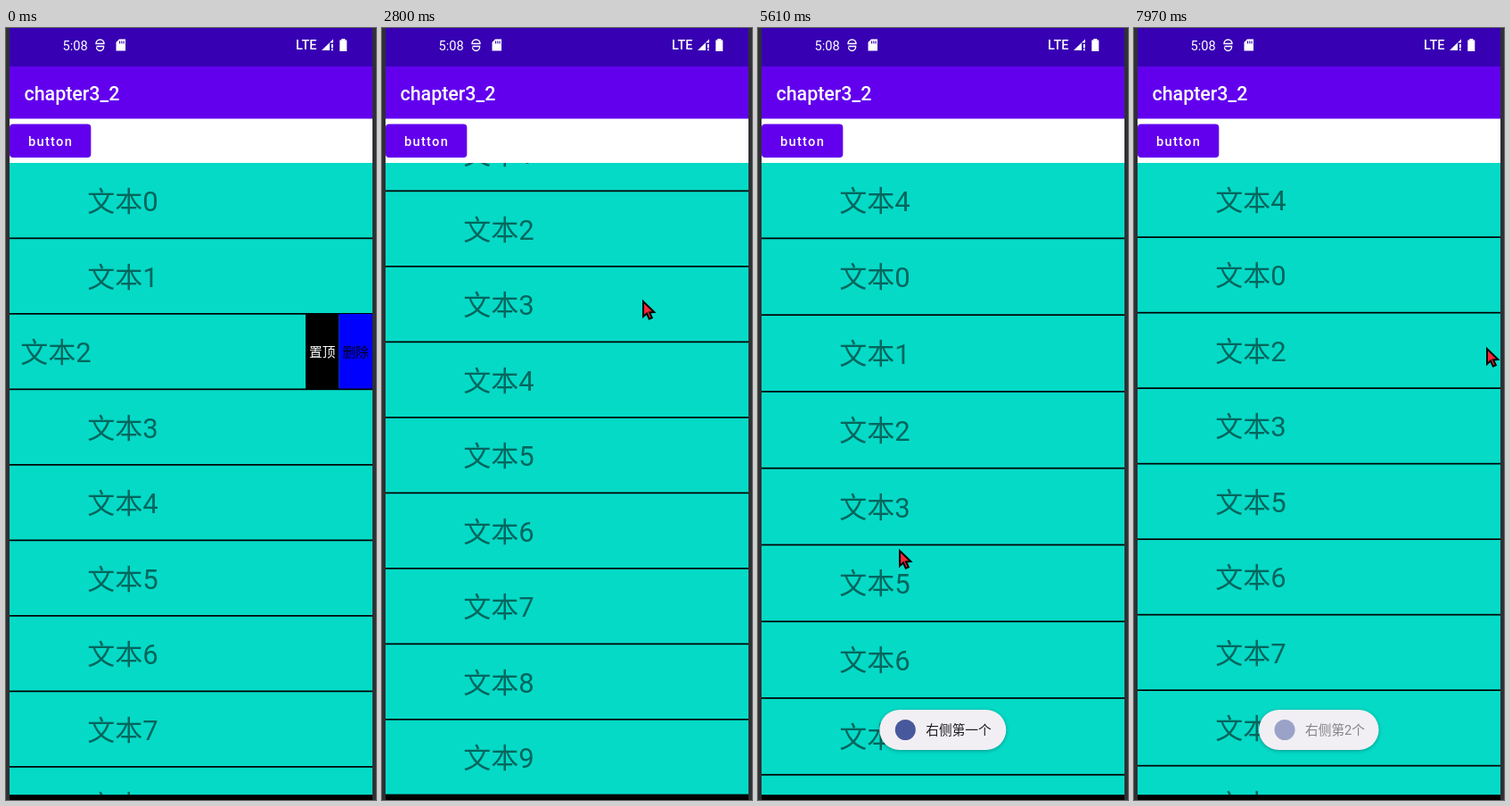
Recreate the animation shown at these times as an HTML page with a canvas. Size 415 px wide and 864 px high, loop 8 s.

```html
<!DOCTYPE html>
<html lang="zh-CN">
<head>
<meta charset="utf-8">
<style>
html, body { margin: 0; width: 100%; height: 100%; overflow: hidden; background: #000; }
canvas { display: block; }
</style>
</head>
<body>
<canvas id="stage" width="415" height="864"></canvas>
<script>
const ctx = document.getElementById('stage').getContext('2d');
const LOOP = 8000, LEFT = 4, RIGHT = 411, WIDTH = RIGHT - LEFT, TOP = 151, BOTTOM = 858;
const PITCH = 84.5, MENU = 75, MAX_SCROLL = 137.5;
const TEAL = '#05dac7', PURPLE = '#6200ee', STATUS = '#3700b3', MUTED = '#03665d';
const MOVED = 4950, REMOVED = 7900;

// Pointer gestures: down, up, start x, start y, end x, end y.
const gestures = [
  [-700, -680, 430, 880, 430, 880],
  [1020, 1400, 301, 363, 390, 370],
  [1900, 2430, 300, 540, 292, 305],
  [3400, 3560, 175, 390, 171, 528],
  [3980, 4260, 290, 522, 185, 519],
  [4760, 4830, 363, 520, 363, 520],
  [5230, 5550, 230, 470, 158, 584],
  [6150, 6700, 270, 372, 161, 375],
  [7700, 7770, 395, 358, 395, 358]
];

const clamp = v => Math.max(0, Math.min(1, v));
const mix = (a, b, u) => a + (b - a) * u;

// Smooth 0..1 progress of t between two times.
function ramp(t, from, to) {
  const u = clamp((t - from) / (to - from));
  return u * u * (3 - 2 * u);
}

const scrollAt = t => MAX_SCROLL * ramp(t, 1930, 2220) - 129.1 * ramp(t, 3460, 3590)
  + 2.4 * ramp(t, 4000, 4100) - 9.6 * ramp(t, 5230, 5380);
const bottomStretch = t => .009 * ramp(t, 2200, 2330) * (1 - ramp(t, 2420, 2720));
const topStretch = t => .0175 * ramp(t, 5380, 5520) * (1 - ramp(t, 5520, 5900));

// How far each row is swiped open, 0..1.
const openRows = {
  2: t => 1 - ramp(t, 1080, 1400),
  4: t => t < MOVED ? ramp(t, 4040, 4270) : 0,
  1: t => t < REMOVED ? ramp(t, 6200, 6560) : 0
};

// Drag while pressed, then rest for half the gap before moving on.
function pointerAt(t) {
  const i = gestures.findLastIndex(([down]) => t >= down);
  const [down, up, x0, y0, x1, y1] = gestures[i];
  if (t < up) {
    const u = ramp(t, down, up);
    return { x: mix(x0, x1, u), y: mix(y0, y1, u), pressed: true };
  }
  const [nextDown, , nextX, nextY] = gestures[i + 1] || [LOOP, 0, x1, y1];
  const u = ramp(t, i ? (up + nextDown) / 2 : 170, nextDown);
  return { x: mix(x1, nextX, u), y: mix(y1, nextY, u), pressed: false };
}

function rect(x, y, w, h, color) {
  ctx.fillStyle = color;
  ctx.fillRect(x, y, w, h);
}

function pill(x, y, w, h, radius, color) {
  ctx.fillStyle = color;
  ctx.beginPath();
  ctx.roundRect(x, y, w, h, radius);
  ctx.fill();
}

function disc(x, y, radius, color) {
  ctx.fillStyle = color;
  ctx.beginPath();
  ctx.arc(x, y, radius, 0, 7);
  ctx.fill();
}

function label(text, x, y, size, color, weight = 400, spacing = 0) {
  ctx.font = `${weight} ${size}px Roboto, "Noto Sans CJK SC", "Noto Sans CJK JP", sans-serif`;
  ctx.letterSpacing = spacing + 'px';
  ctx.fillStyle = color;
  ctx.fillText(text, x, y);
}

function drawIcons() {
  ctx.strokeStyle = ctx.fillStyle = '#fff';
  ctx.lineWidth = 1.4;
  ctx.stroke(new Path2D('M101 17.5a4.5 4.5 0 0 1 9 0zM101.5 20.5h8v1a4 4 0 0 1-8 0'));
  ctx.fill(new Path2D('M127 12.5h7v13h-10.5v-9.5z'));
  ctx.fill(new Path2D('M354 25l13-12.5v4h-4v8.5zM365 18h1.8v4.5h-1.8zM365 23.5h1.8v1.8h-1.8z'));
  ctx.fill(new Path2D('M376.3 12h4v1.5h2v12.5h-8v-12.5h2z'));
  for (let x = 127; x < 133; x += 2.3) rect(x, 14.5, 1.1, 3, STATUS);
}

function drawHeader() {
  rect(LEFT, 0, WIDTH, 43, STATUS);
  rect(LEFT, 101, WIDTH, 50, '#fff');
  rect(LEFT, 43, WIDTH, 58.5, PURPLE);
  label('5:08', 63.5, 24.5, 14.6, '#fff');
  label('LTE', 325, 24, 14.6, '#fff', 500);
  drawIcons();
  label('chapter3_2', 20.5, 80.5, 21.4, '#fff', 500);
  pill(LEFT, 107.5, 91.3, 37.5, 4, PURPLE);
  label('button', 25, 132, 14.6, '#fff', 500, 1.3);
}

function drawRow(digit, y, open) {
  label('文本' + digit, 91.2 - open, y + 54, 31, MUTED);
  if (open > 0) {
    const x = RIGHT - open;
    rect(x, y, MENU / 2, PITCH, '#000');
    rect(x + MENU / 2, y, MENU / 2, PITCH, '#00f');
    label('置顶', x + 4, y + 47.8, 14.7, '#fff');
    label('删除', x + 41.5, y + 47.8, 14.7, '#00001c');
  }
  rect(LEFT, y + PITCH - 1, WIDTH, 1.7, '#000');
}

function drawList(t) {
  const order = t < MOVED ? '0123456789' : t < REMOVED ? '4012356789' : '402356789';
  const low = bottomStretch(t), high = topStretch(t), scroll = scrollAt(t);
  const anchor = low > 0 ? BOTTOM : TOP;

  ctx.save();
  ctx.beginPath();
  ctx.rect(LEFT, TOP, WIDTH, BOTTOM - TOP);
  ctx.clip();
  rect(LEFT, TOP, WIDTH, BOTTOM - TOP, TEAL);
  ctx.translate(0, anchor);
  ctx.scale(1, 1 + low + high);
  ctx.translate(0, -anchor);
  [...order].forEach((digit, i) => {
    const open = openRows[digit] ? MENU * openRows[digit](t) : 0;
    drawRow(digit, TOP + i * PITCH - scroll, open);
  });
  ctx.restore();
}

function drawToast(t, start, end, text, width) {
  if (t < start || t > end) return;
  const fadeOut = clamp((end - t) / 170);
  const shown = clamp((t - start) / 110);
  const scale = mix(.915, 1, shown);
  ctx.save();
  ctx.translate(207.3, 785.5);
  ctx.scale(scale, scale);
  ctx.globalAlpha = shown * fadeOut;
  ctx.shadowColor = `rgba(0,0,0,${.3 * shown ** 4})`;
  ctx.shadowBlur = 4;
  ctx.shadowOffsetY = 1;
  pill(-width / 2, -22.5, width, 45, 22.5, '#f2eff4');
  ctx.shadowColor = 'transparent';
  ctx.globalAlpha = clamp((t - start - 110) / 100) * fadeOut;
  disc(29 - width / 2, 0, 11.5, '#47599c');
  label(text, 52 - width / 2, 5.7, 14.7, '#1b1b1f');
  ctx.restore();
}

function drawPointer(t) {
  const { x, y, pressed } = pointerAt(t);
  const arrow = new Path2D('M0 0V17L4 13.5L6.8 19.6L9.8 18.3L7 12.4L12.3 12Z');
  ctx.save();
  ctx.translate(x + 1, y + 1);
  // The pointer inverts whatever lies beneath it.
  ctx.globalCompositeOperation = 'difference';
  ctx.fillStyle = '#fff';
  ctx.fill(arrow);
  ctx.globalCompositeOperation = 'source-over';
  if (pressed) disc(-.5, -1, 12, 'rgba(235,245,5,.5)');
  ctx.strokeStyle = '#000';
  ctx.lineWidth = 2;
  ctx.stroke(arrow);
  ctx.restore();
}

function draw() {
  const t = performance.now() % LOOP;
  rect(0, 0, 415, 864, '#000');
  drawHeader();
  drawList(t);
  drawToast(t, 4860, 7100, '右侧第一个', 142);
  drawToast(t, 7810, 9900, '右侧第2个', 134.5);
  rect(0, 0, LEFT, 864, '#2f3033');
  rect(RIGHT, 0, 4, 864, '#2f3033');
  drawPointer(t);
  requestAnimationFrame(draw);
}
draw();
</script>
</body>
</html>
```
